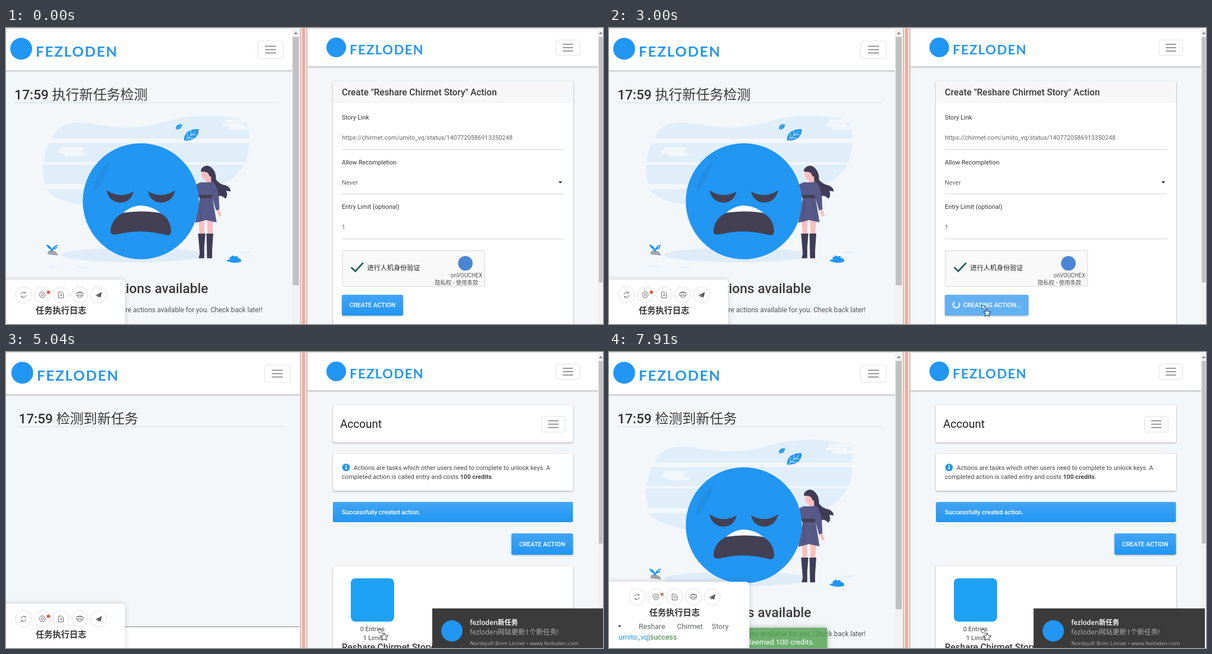
Write an HTML page that moves like this. It is 1063 px wide and 527 px high and loops after 8000 ms.

```html
<!DOCTYPE html>
<html lang="zh">
<head>
<meta charset="utf-8">
<title>Task helper</title>
<style>
html, body { margin: 0; width: 100%; height: 100%; overflow: hidden; background: #f3f7fa; }
svg { display: block; width: 1063px; height: 527px; }
text { font-family: Roboto, "Noto Sans CJK SC", "Noto Sans CJK JP", sans-serif; white-space: pre; }
.logo { font-family: Lato, sans-serif; font-weight: 700; fill: #2196f3; }
.note text { font-family: "Open Sans", "Noto Sans CJK SC", "Noto Sans CJK JP", sans-serif; }
.card { fill: #fff; filter: drop-shadow(0 1px 1.5px rgba(0,0,0,.35)); }
.raised { filter: drop-shadow(0 1.5px 1.5px rgba(0,0,0,.3)); }
.line { fill: none; stroke-linecap: round; stroke-linejoin: round; }
.cut { animation: 8s step-end infinite; }
.spin { animation: spin 8s linear infinite; }
.pointer { animation: point 8s infinite; }
.note { animation: slide 8s infinite; }
.toast { animation: fade 8s linear infinite; }
@keyframes spin { from { transform: rotate(-78deg); } to { transform: rotate(3762deg); } }
@keyframes point {
  0%, 4.5% { transform: translate(983px, 518px); animation-timing-function: cubic-bezier(.35,.3,.4,1); }
  13.375%, 100% { transform: translate(663px, 493px); }
}
@keyframes slide {
  0%, 58% { transform: translateX(308px); animation-timing-function: cubic-bezier(.215,.61,.355,1); }
  64%, 100% { transform: none; }
}
@keyframes fade { 0%, 95.5% { opacity: 0; } 98.75%, 100% { opacity: .83; } }
</style>
</head>
<body>
<svg id="stage" viewBox="0 0 1063 527"></svg>
<script>
const BLUE = '#2196f3', DARK = '#444053', PALE = '#e0eefa', BG = '#f3f7fa';
let css = '', count = 0;

// Visible between alternating on/off times in ms.
function shown(body, ...cuts) {
  const id = 'cut' + count++;
  const keys = cuts.map((t, i) => `${t / 80}%{opacity:${i % 2 ? 0 : 1}}`).join('');
  css += `@keyframes ${id}{${cuts[0] ? '0%{opacity:0}' : ''}${keys}}`;
  return `<g class="cut" style="animation-name:${id}">${body}</g>`;
}
const text = (x, y, size, str, fill = '#444', extra = '') =>
  `<text x="${x}" y="${y}" font-size="${size}" fill="${fill}" ${extra}>${str}</text>`;
const rect = (x, y, r, b, fill, extra = '') =>
  `<rect x="${x}" y="${y}" width="${r - x}" height="${b - y}" fill="${fill}" ${extra}/>`;
const path = (d, fill, extra = '') => `<path d="${d}" fill="${fill}" ${extra}/>`;
const line = (d, stroke, w = 1, extra = '') =>
  `<path class="line" d="${d}" stroke="${stroke}" stroke-width="${w}" ${extra}/>`;
const dot = (x, y, r, fill, extra = '') => `<circle cx="${x}" cy="${y}" r="${r}" fill="${fill}" ${extra}/>`;
const oval = (x, y, rx, ry, fill) => `<ellipse cx="${x}" cy="${y}" rx="${rx}" ry="${ry}" fill="${fill}"/>`;
const at = (x, y, body, more = '') => `<g transform="translate(${x} ${y}) ${more}">${body}</g>`;
const card = (x, y, r, b) => rect(x, y, r, b, '#fff', 'class="card" rx="3"');
const MID = 'text-anchor="middle"', END = 'text-anchor="end"', MEDIUM = 'font-weight="500"';

const button = (x, y, r, b, label, size, fill = 'url(#blue)', tx = (x + r) / 2) =>
  rect(x, y, r, b, fill, 'rx="3" class="raised"') +
  text(tx, (y + b) / 2 + size * .36, size, label, '#fff', MEDIUM + ' ' + MID);
const menu = (x, y, w, h) =>
  rect(x + .5, y + .5, x + w - .5, y + h - .5, '#fff', 'rx="3" stroke="#dfe1e4"') +
  [-6, 0, 6].map(d => line(`M${x + w * .3} ${y + h / 2 + d}h${w * .4}`, '#77727a', 1.4)).join('');
const logo = (x, y, r, size, gap, textX, base) =>
  dot(x, y, r, BLUE) + text(textX, base, size, 'FEZLODEN', BLUE, `class="logo" letter-spacing="${gap}"`);
const spinner = (x, y, r, w, turn = 0) => at(x, y,
  `<g class="spin"><circle r="${r}" fill="none" stroke="#fff" stroke-width="${w}" pathLength="4" stroke-dasharray="3 1" transform="rotate(45)"/></g>`,
  `rotate(${turn})`);
const scrollbar = (x, r, end) =>
  rect(x, 1, r, 527, '#f1f1f1') + rect(x + 1.5, 16, r - 1.5, end, '#c1c1c1') +
  path(`M${(x + r) / 2 - 3.5} 11l3.5 -4l3.5 4z`, '#8a8a8a');

function header(x, r, bottom) {
  return rect(x, 0, r, bottom, '#fff') + rect(x, 0, r, 1.2, '#d6d6d6') +
    rect(x, bottom - .6, r, bottom + 1, '#bfc2c4') + rect(x, bottom + 1, r, bottom + 2.5, '#e3e7ea');
}
const heading = (x, words) =>
  text(x, 127, 24, '17:59 ', '#333', MEDIUM) + text(x + 67, 127, 24.3, words, '#3a3a3a') +
  rect(x, 132.5, x + 470.5, 133.5, '#d8dde2');

function picture() {
  const sky = [
    'M82 197C91 172 112 165 150 170C205 180 245 179 290 165C335 152 400 155 424 165Q434 173 433 197Z',
    'M77 205H433C432 221 428 233 427 239H67Q69 219 77 205Z',
    'M66 243H425C412 263 398 273 385 278H70Q65 261 66 243Z',
    'M71 287H350Q330 312 260 316C195 325 95 320 71 287Z'
  ].map(d => path(d, PALE)).join('');
  const clouds = [[97, 212, 139, 217], [93, 217, 134, 223], [104, 222, 143, 228], [391, 163, 433, 169], [386, 170, 424, 175], [397, 175, 433, 181]]
    .map(c => rect(...c, BG, 'rx="2.5"')).join('');
  const face = dot(240, 308.5, 103.3, BLUE) +
    path('M186 237Q157 257 155 293Q175 276 186 237Z', '#228fe6') +
    path('M179 289Q203 305 227 291Q223 310 203 311Q183 309 179 289Z', DARK) +
    path('M253 291Q277 305 301 289Q297 309 277 311Q257 310 253 291Z', DARK) +
    path('M204 334Q219 317 240 316Q262 317 278 332Z', '#fff') +
    path('M186 360C189 339 203 332 209 329Q240 324 273 329C283 333 293 343 294 361Q294 372 283 368Q240 357 200 367Q185 371 186 360Z', DARK);
  const woman =
    path('M347 252Q354 242 365 248Q374 254 374 270Q381 279 391 280Q400 284 400 291L392 290Q396 297 391 304Q382 296 378 300Q366 295 361 282Z', '#3f3d56') +
    path('M349 256Q347 269 356 271L355 280H366L364 252Z', '#fbbebe') +
    path('M347 256Q348 246 358 245Q368 246 369 257Q364 268 362 263Q360 254 347 256Z', '#3f3d56') +
    path('M374 314l7 12l3 8l-5 2l-6 -18zM343 342h10v28h-8zM358 342h11l-2 28h-8z', '#fbbebe') +
    path('M337 280Q346 273 354 275L369 274Q376 281 379 300L380 323L374 325L368 304L375 346L356 342L337 347L345 302Q337 298 337 280Z', '#575a89') +
    rect(344, 297, 367, 303, DARK) + line('M349 309L346 342M362 307L367 340', '#474a78', 1) +
    path('M342 366h13l-2 24v20h-10l2 -8zM357 366h12l-2 30v14h-9z', '#3f3d56');
  const leaf = path('M317 201Q316 180 343 180Q344 200 317 201Z', BLUE) +
    line('M317 202L338 184M323 196v-8M329 191v-8M324 196h9M330 190h9', '#fff', .9) +
    path('M303 181Q301 171 313 171Q314 180 303 181Z', BLUE) + line('M303 181l8 -8', '#fff', .6);
  const plants = path('M74 403Q73 395 81 396Q91 397 93 405Z', '#a2a5aa') +
    line('M81 397Q80 389 73 387M82 397Q83 390 91 387M81 394L75 390M83 394L90 391', BLUE, 2.4) +
    path('M392 414Q401 410 400 413Q395 407 402 407Q401 403 407 407Q414 404 412 409Q419 410 419 416Q405 421 392 414Z', BLUE);
  return sky + clouds + oval(228, 404, 130, 13, '#dfecf8') + oval(425, 399.5, 10, 1.3, PALE) +
    oval(83, 425, 10, 1.3, PALE) + oval(134, 426, 9, 1, PALE) + woman + face + leaf + plants;
}

const emptyPage = rect(0, 0, 510, 527, BG) + header(0, 509, 76) + scrollbar(509, 523, 458) +
  logo(27, 37, 19.5, 25.5, 1.9, 53, 50.5) + menu(448, 22.5, 46, 32) + picture() +
  text(360, 472, 24, 'No actions available', '#3a3a3a', MEDIUM + ' ' + END) +
  text(457, 506, 12.2, 'There are no more actions available for you. Check back later!', '#555', END);

const widePage = rect(0, 0, 523, 527, BG) + header(0, 523, 76) +
  logo(29, 37, 19.5, 25.5, 1.9, 55, 50.5) + menu(460, 22.5, 46, 32) + heading(22.5, '检测到新任务') +
  rect(0, 489, 523, 527, '#fff') + rect(0, 488.5, 523, 490, '#a3a6a8');

const taskCard = card(22.5, 156, 493, 298) + rect(50, 178, 92, 220, '#1da1f2', 'rx="4"') +
  text(70.5, 234, 11.2, 'Report', '#666', MID) +
  text(128, 195.5, 15, 'Reshare the story of "umito_vq" on Chirmet', '#444', MEDIUM) +
  line('M134 217h-5v9h9v-4M133 222l7 -6M136 216h4.5v4.5', '#555', 1.5) + text(148.5, 226, 12.2, '0 Clicks', '#666') +
  line('M210 222l3 3l6 -7', '#444', 2.2) + text(228, 226, 12.2, '0 Entries', '#666');

function panel(cx, cy, width, words, dotFill) {
  const icons = [
    line('M-4.5 -1a4.6 4.6 0 0 1 8 -2v-2M3.5 -3h-2M4.5 1a4.6 4.6 0 0 1 -8 2v2M-3.5 3h2', '#666'),
    line('M-2.5 -5h5l3 5l-3 5h-5l-3 -5z', '#666') + dot(0, 0, 2, 'none', 'stroke="#666"'),
    line('M-4 -5h5.5l3 3v7.5h-8.5zM-1.5 -1h3.5M-1.5 1.5h3.5', '#666'),
    line('M-3 2h-2.5v-5.5h11v5.5h-2.5M-3 -3.5v-1.5h6v1.5M-2.5 0h5v4l-2.5 1.5l-2.5 -1.5z', '#666'),
    path('M-5.5 1L6 -5L3.5 5L0 3L-1.5 5.5L-2 2L3 -2L-3 2Z', '#555')
  ];
  const body = icons.map((icon, i) =>
    at(cx + (i - 2) * 33.4, cy, dot(0, 0, 14.5, '#fff', 'stroke="#dcdfe6"') + icon)).join('');
  let log = '';
  if (words) {
    const result = (s, fill) => text(17, cy + 76, 13,
      `umito_vq<tspan fill="#555">|</tspan><tspan fill="${fill}">${s}</tspan>`, BLUE);
    log = dot(19, cy + 52, 2, '#555') +
      ['Reshare', 'Chirmet', 'Story'].map((w, i) => text(words[i], cy + 57, 13, w, '#606266')).join('') +
      shown(result('wait', '#888'), 5280, 6840) + shown(result('success', '#2e7d32'), 6840);
  }
  return rect(-9, cy - 27, width, 540, '#fff', 'rx="6" style="filter:drop-shadow(0 0 4px rgba(0,0,0,.18))"') +
    body + dot(cx - 22.5, cy - 4.5, 3, dotFill) +
    text(cx, cy + 33, 15, '任务执行日志', '#333', MID + ' font-weight="700"') + log;
}

const left =
  shown(emptyPage + shown(heading(15, '执行新任务检测'), 0, 3540) + shown(heading(15, '检测到新任务'), 7600), 0, 3540, 7600) +
  shown(widePage, 3540, 7600) +
  shown(taskCard, 5120, 7600) +
  shown(button(303, 238, 388, 279, 'OPEN URL', 12) + button(399, 238, 475, 279, 'REDEEM', 12), 5120, 6840) +
  shown(button(246, 238, 332, 279, 'OPEN URL', 12) +
    button(343, 238, 475, 279, 'REDEEMING...', 12, '#70baf6', 421) + spinner(365, 259, 7, 1.7, 64), 6840, 7600) +
  `<g class="toast">${rect(130, 491, 388.5, 540, '#51a351', 'rx="3" style="filter:drop-shadow(0 0 5px #999)"') +
    text(366, 520.5, 13.2, 'Successfully redeemed 100 credits.', '#fff', END)}</g>` +
  shown(panel(98, 475, 212, null, '#e0574c'), 0, 5280) +
  shown(panel(120.5, 436, 257, [55, 126, 190], '#e58a62'), 5280, 7600) +
  shown(panel(116.8, 436, 250, [53, 121, 183], '#c98a68'), 7600);

const divider = rect(523, 0, 537, 527, '#fbe8e4') +
  [[524, '#dd9a8e'], [528, '#d4705f'], [530.5, '#d4705f'], [535, '#dd9a8e']]
    .map(([x, c]) => rect(x, 0, x + 1.2, 527, c)).join('');

const rightBase = rect(537, 0, 1063, 527, BG) + header(537, 1054, 69) +
  logo(588, 34.5, 17.5, 23.2, 1.6, 612, 47) + menu(979, 21, 43, 28);

const rule = y => rect(598, y, 993, y + 1, '#d2d2d2');
const form = scrollbar(1054, 1064, 453) + card(582, 95, 1010, 540) +
  rect(582, 95, 1010, 134, '#f7f7f7', 'rx="3"') +
  text(598, 120, 16.2, 'Create "Reshare Chirmet Story" Action', '#3a3a3a', MEDIUM) +
  text(598, 163, 11, 'Story Link', '#333') +
  text(598, 199, 11, 'https://chirmet.com/umito_vq/status/1407720586913350248', '#666') + rule(216) +
  text(598, 242.5, 11, 'Allow Recompletion', '#333') + text(598, 278.5, 11, 'Never', '#666') +
  path('M983.5 273h7l-3.5 3.7z', '#333') + rule(295) +
  text(598, 321.5, 11, 'Entry Limit (optional)', '#333') + text(598, 357.5, 11, '1', '#666') + rule(375) +
  rect(599, 396.5, 852, 460, '#f9f9f9', 'rx="2" stroke="#d3d3d3"') +
  line('M614.5 426l7.5 7l14 -15', '#255a58', 2.8, 'style="stroke-linecap:butt;stroke-linejoin:miter"') +
  text(643, 431, 11.8, '进行人机身份验证', '#222') + dot(818, 419, 13, '#4a86d4') +
  text(848, 444, 10, 'onVOUCHEX', '#555', END) + text(841, 457, 10, '隐私权 - 使用条款', '#555', END);

const busy = fill => button(598, 475, 747, 512, 'CREATING ACTION...', 11, fill, 682.5) + spinner(618.5, 492.5, 5.8, 2.1);
const formButtons =
  shown(button(598, 475, 707, 512, 'CREATE ACTION', 11), 0, 900) +
  shown(button(598, 475, 707, 512, 'CREATE ACTION', 11, '#0d82e2'), 900, 1450) +
  shown(busy('#0d82e2'), 1450, 1920) + shown(busy('#64b1f2'), 1920, 4640);

const account = scrollbar(1054, 1064, 341) + card(582, 95, 1010, 161) +
  text(595, 135, 20, 'Account', '#222') + menu(953, 114, 43, 29) +
  card(582, 181, 1010, 247) + dot(605.5, 205.5, 6.8, BLUE) + rect(604.6, 204.5, 606.6, 209, '#fff') + dot(605.5, 202.3, 1.2, '#fff') +
  text(619, 210, 11.1, 'Actions are tasks which other users need to complete to unlock keys. A') +
  text(598, 226, 11.1, 'completed action is called entry and costs <tspan font-weight="700">100 credits</tspan>.') +
  rect(582, 267, 1009.5, 303, 'url(#blue)', 'rx="3"') + text(598, 289, 11.1, 'Successfully created action.', '#fff', MEDIUM) +
  button(900, 323, 1009.5, 361, 'CREATE ACTION', 11) +
  card(582, 381, 1010, 540) + rect(614, 403, 691, 480, '#1da1f2', 'rx="8"') +
  text(652.5, 497, 11.2, '0 Entries', '#444', MID) + text(653, 513, 11.2, '1 Limit', '#444', MID) +
  text(598, 531, 16.2, 'Reshare Chirmet Story', '#3a3a3a', MEDIUM);

const note = `<g class="note">${rect(756, 456.5, 1061, 527, '#3b3b3b') + dot(791, 496.5, 19, BLUE) +
  text(823, 486, 12, 'fezloden新任务', '#fff', 'font-weight="600"') +
  text(823, 503, 12.3, 'fezloden网站更新1个新任务!', '#b0b0b0') +
  text(823, 522, 9.8, 'Nordquill Brim Linnet • www.fezloden.com', '#b2b2b2')}</g>`;

const star = Array.from({ length: 10 }, (_, i) => {
  const a = i * Math.PI / 5 - Math.PI / 2, r = i % 2 ? 3.4 : 7.2;
  return `${(10.5 + r * Math.cos(a)).toFixed(1)} ${(14.5 + r * Math.sin(a)).toFixed(1)}`;
}).join('L');
const arrow = (fill, stroke) =>
  path('M0 1L7 2L5 4L9 7.5L7 9L3.5 6L1.5 8Z', fill, `stroke="${stroke}"`) +
  path(`M${star}Z`, fill, `stroke="${stroke}" stroke-width="1.2" stroke-linejoin="round"`);
const pointer = shown(`<g class="pointer">${
  shown(arrow('#fff', '#5a5560'), 0, 900, 4640) + shown(arrow('#cfeafb', '#33526e'), 900, 4640)}</g>`, 380);

document.getElementById('stage').innerHTML =
  `<defs><linearGradient id="blue" x2="0" y2="1"><stop stop-color="#42a5f5"/><stop offset="1" stop-color="${BLUE}"/></linearGradient></defs>` +
  left + divider + rightBase + shown(form, 0, 4640) + formButtons + shown(account, 4640) + pointer + note;
document.head.appendChild(document.createElement('style')).textContent = css;
</script>
</body>
</html>
```
